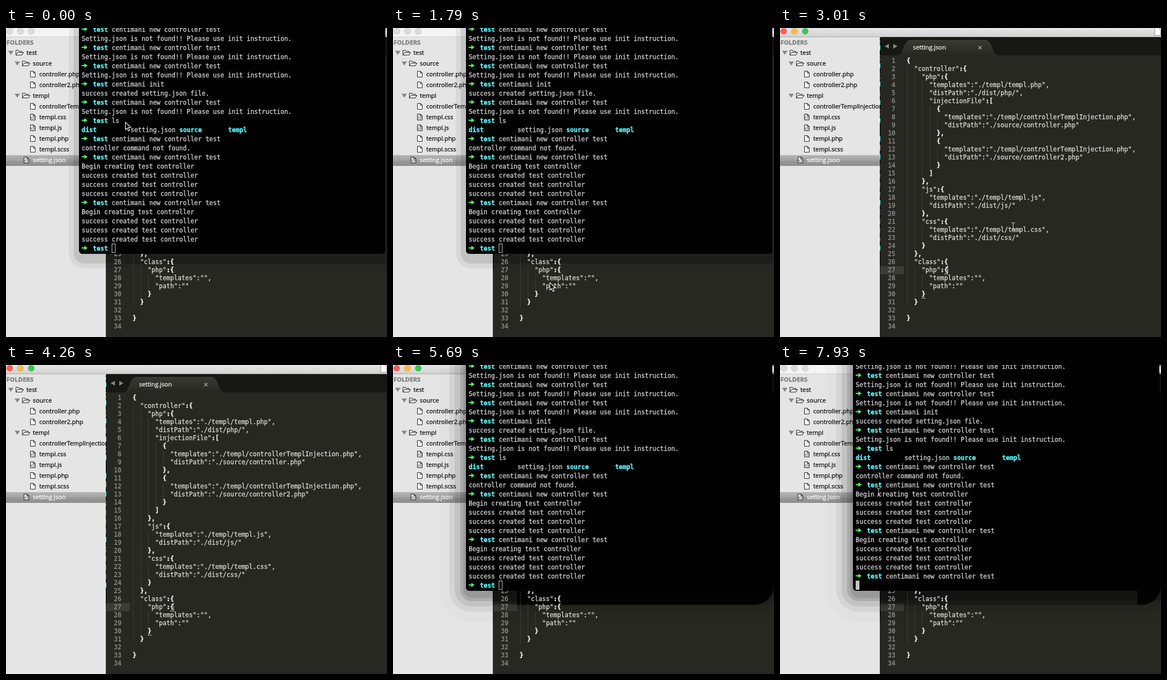
An HTML page with a canvas that plays this animation: 710x576 px, repeating every 8 s.

```html
<!DOCTYPE html>
<html lang="en">
<head>
<meta charset="utf-8">
<title>Terminal and editor</title>
<style>
  html, body { margin: 0; width: 100%; height: 100%; overflow: hidden; background: #272822; }
  canvas { display: block; }
</style>
</head>
<body>
<canvas id="stage" width="710" height="576"></canvas>
<script>
const ctx = document.getElementById('stage').getContext('2d');
const W = 710, H = 576, LOOP = 8000;
const MONO = '11.627px "DejaVu Sans Mono", monospace';
const SANS = '11.4px "Open Sans", sans-serif';
const COL = 7;
const EDITOR_FRONT = 1870, TERM_FRONT = 5690, TERM_ACTIVE = 5780;
const TYPED = 7030, ENTERED = 7930;

const code = `{
  "controller":{
    "php":{
      "templates":"./templ/templ.php",
      "distPath":"./dist/php/",
      "injectionFile":[
        {
          "templates":"./templ/controllerTemplInjection.php",
          "distPath":"./source/controller.php"
        },
        {
          "templates":"./templ/controllerTemplInjection.php",
          "distPath":"./source/controller2.php"
        }
      ]
    },
    "js":{
      "templates":"./templ/templ.js",
      "distPath":"./dist/js/"
    },
    "css":{
      "templates":"./templ/templ.css",
      "distPath":"./dist/css/"
    }
  },
  "class":{
    "php":{
      "templates":"",
      "path":""
    }
  }

}
`.split('\n');

// label, depth, kind
const tree = [
  ['test', 0, 'folder'], ['source', 1, 'folder'],
  ['controller.php', 2, 'file'], ['controller2.php', 2, 'file'],
  ['templ', 1, 'folder'], ['controllerTemplInjection.php', 2, 'file'],
  ['templ.css', 2, 'code'], ['templ.js', 2, 'code'],
  ['templ.php', 2, 'file'], ['templ.scss', 2, 'file'],
  ['setting.json', 1, 'code']
];

const CREATE = '$centimani new controller test';
const MISSING = 'Setting.json is not found!! Please use init instruction.';
const DONE = 'success created test controller';
const created = [CREATE, 'Begin creating test controller', DONE, DONE, DONE];
const history = [
  CREATE, MISSING, CREATE, MISSING, CREATE, MISSING,
  '$centimani init', 'success created setting.json file.',
  CREATE, MISSING, '$ls', '*', CREATE, 'controller command not found.',
  ...created, ...created
];

// time, pointer kind, x, y
const pointer = [
  [0, 'arrow', 222, 175], [360, 'arrow', 217, 175], [450, 'arrow', 214, 175],
  [1080, 'arrow', 228, 220], [1170, 'arrow', 255, 280],
  [1260, 'arrow', 282, 325], [1350, 'arrow', 291, 341],
  [1520, 'arrow', 290, 365], [1610, 'arrow', 289, 420],
  [1700, 'arrow', 291, 460], [1790, 'arrow', 292, 474],
  [1870, 'beam', 294, 480], [2140, 'beam', 280, 440], [2220, 'beam', 265, 360],
  [2310, 'beam', 285, 280], [2400, 'beam', 340, 234], [2490, 'beam', 450, 300],
  [2570, 'beam', 530, 430], [2660, 'beam', 540, 546], [2840, 'beam', 655, 563],
  [2930, 'beam', 560, 460], [3010, 'beam', 434, 370], [3100, 'beam', 442, 356],
  [3280, 'beam', 475, 400], [3370, 'beam', 492, 430],
  [3460, 'none', 0, 0], [5950, 'beam', 183, 237]
];

// time, caret opacity
const caret = [
  [0, 1], [2400, .5], [2490, 0], [2840, .5], [2930, 1], [3280, .6], [3370, .3], [3460, 0],
  [3820, .3], [3910, .6], [3990, 1], [4260, .5], [4440, 0],
  [4790, .5], [4880, 1], [5240, .5], [5420, 0]
];

const latest = (keys, t) => keys.filter(k => k[0] <= t).pop();

function rect(x, y, w, h, fill) {
  ctx.fillStyle = fill;
  ctx.fillRect(x, y, w, h);
}

// A hairline stroke gives the heavier font smoothing of the desktop.
function text(str, x, y, color, font, align = 'left') {
  ctx.font = font;
  ctx.textAlign = align;
  ctx.fillStyle = ctx.strokeStyle = color;
  ctx.lineWidth = .3;
  ctx.fillText(str, x, y);
  ctx.strokeText(str, x, y);
}

function poly(points, fill, stroke, width = 1) {
  ctx.beginPath();
  points.forEach(([x, y]) => ctx.lineTo(x, y));
  ctx.closePath();
  if (fill) { ctx.fillStyle = fill; ctx.fill(); }
  if (stroke) { ctx.strokeStyle = stroke; ctx.lineWidth = width; ctx.stroke(); }
}

function vertical(y0, y1, top, bottom) {
  const g = ctx.createLinearGradient(0, y0, 0, y1);
  g.addColorStop(0, top);
  g.addColorStop(1, bottom);
  return g;
}

function titleBar(active) {
  rect(0, 0, W, 16, active ? vertical(0, 16, '#e6e6e6', '#d2d2d2') : '#f4f4f4');
  rect(0, 16, W, 1, active ? '#a9a9a9' : '#cfcfcf');
  ['#fc5b57', '#fdbc40', '#34c84a'].forEach((color, i) => {
    ctx.beginPath();
    ctx.arc(7 + 20 * i, 6, 5.8, 0, 7);
    ctx.fillStyle = active ? color : '#dcdcdc';
    ctx.fill();
    ctx.strokeStyle = active ? 'rgba(0,0,0,.12)' : '#c6c6c6';
    ctx.lineWidth = 1;
    ctx.stroke();
  });
}

function pageIcon() {
  poly([[698.5, -1], [705, -1], [709.5, 4], [709.5, 13.5], [698.5, 13.5]], '#fff', '#999');
}

function folderIcon(x, y) {
  poly([[x + .5, y + 4.5], [x + .5, y - 4.5], [x + 5.5, y - 4.5], [x + 6.5, y - 2.5],
    [x + 11.5, y - 2.5], [x + 11.5, y - .5], [x + 14.5, y - .5], [x + 11.5, y + 4.5]], '#f0f0f0', '#222');
  poly([[x + .5, y + 4.5], [x + 3.5, y - .5], [x + 14.5, y - .5], [x + 11.5, y + 4.5]], '#f0f0f0', '#222');
}

function fileIcon(x, y, isCode) {
  y = Math.round(y);
  poly([[x + .5, y - 5.5], [x + 6, y - 5.5], [x + 9.5, y - 2], [x + 9.5, y + 5.5], [x + .5, y + 5.5]],
    isCode ? '#e4e4e4' : '#f7f7f7', '#222');
  poly([[x + 6, y - 5.5], [x + 6, y - 2], [x + 9.5, y - 2]], null, '#222');
  if (!isCode) return;
  ctx.beginPath();
  for (const d of [-1, 1]) {
    ctx.moveTo(x + 5 + d, y - .5);
    ctx.lineTo(x + 5 + 3 * d, y + 1.5);
    ctx.lineTo(x + 5 + d, y + 3.5);
  }
  ctx.stroke();
}

function sidebar() {
  ctx.save();
  ctx.beginPath();
  ctx.rect(0, 17, 186, H);
  ctx.clip();
  rect(0, 17, 187, H, '#e5e5e5');
  text('FOLDERS', 1, 31, '#7e7e7e', 'bold ' + SANS);
  tree.forEach(([label, depth, kind], i) => {
    const y = 46 + 20 * i, selected = i === tree.length - 1;
    if (selected) {
      rect(0, 237, 187, 20, '#8d8d8d');
      rect(0, 237, 187, 10, vertical(237, 247, '#b4b4b4', '#a2a2a2'));
      rect(0, 247, 187, 9, vertical(247, 256, '#999', '#8f8f8f'));
    }
    const x = [38, 50, 62][depth];
    if (kind === 'folder') {
      poly([[x - 34, y - 3.5], [x - 24, y - 3.5], [x - 29, y + 4]], '#858585');
      folderIcon(x - 20, y);
    } else {
      fileIcon(x - 17, y, kind === 'code');
    }
    text(label, x, y + 4, selected ? '#fff' : '#111', SANS);
  });
  ctx.restore();
}

function tabs() {
  rect(187, 17, W, 34, '#171814');
  poly([[203, 29.5], [203, 38.5], [195, 34]], '#85867f');
  poly([[211, 29.5], [211, 38.5], [219, 34]], '#85867f');
  ctx.beginPath();
  ctx.moveTo(222, 51);
  ctx.bezierCurveTo(232, 50, 230, 23, 243, 23);
  ctx.lineTo(383, 23);
  ctx.bezierCurveTo(396, 23, 393, 50, 404, 51);
  ctx.fillStyle = vertical(23, 51, '#383932', '#272822');
  ctx.fill();
  ctx.strokeStyle = '#46473f';
  ctx.lineWidth = 1;
  ctx.stroke();
  text('setting.json', 248, 40, '#f2f2f2', SANS);
  ctx.strokeStyle = '#a5a6a0';
  ctx.lineWidth = 1.5;
  ctx.beginPath();
  for (const d of [-3, 3]) {
    ctx.moveTo(372.5 - d, 33.5);
    ctx.lineTo(372.5 + d, 39.5);
  }
  ctx.stroke();
}

function editorPane(t) {
  rect(187, 17, W, H, '#272822');
  tabs();
  if (t >= EDITOR_FRONT) rect(187, 444, 44, 15, '#3b3c36');
}

function codeLines() {
  code.forEach((line, i) => {
    const y = 65 + 15 * i, indent = line.search(/\S|$/);
    text(i + 1, 215, y, '#8f908a', MONO, 'right');
    for (let c = 0; c < indent; c += 2)
      for (let d = 0; d < 15; d += 2) rect(237 + COL * c, y - 11 + d, 1, 1, '#50514a');
    for (const part of line.matchAll(/[{}[\],:]+|[^{}[\],:\s]+/g)) {
      const mark = /[{}[\]]/.test(part[0]);
      text(part[0], 236 + COL * part.index, y, mark ? '#f8f8f2' : '#dadecf', (mark ? 'bold ' : '') + MONO);
    }
  });
}

function editMarks(t) {
  rect(306, 458, 7, 1, '#d8d9d0');
  rect(264, 503, 7, 1, '#d8d9d0');
  ctx.globalAlpha = latest(caret, t)[1];
  rect(312, 443, 1, 15, '#f8f8f0');
  ctx.globalAlpha = 1;
}

function bands(steps) {
  for (const [spread, alpha] of steps) {
    ctx.beginPath();
    ctx.roundRect(136 - spread, -80, 571 + 2 * spread, 509 + spread, spread + 10);
    ctx.fillStyle = `rgba(0,0,0,${alpha})`;
    ctx.fill();
  }
}

function shadow(t) {
  if (t < EDITOR_FRONT) {
    bands([[19, .06], [10, .1]]);
    rect(187, 420, 520, 19, 'rgba(0,0,0,.12)');
    return;
  }
  bands([[50, .02], [31, .06], [21, .08], [11, .12], [5, .1]]);
  rect(187, 420, 479, 27, 'rgba(0,0,0,.28)');
  const left = t < TERM_ACTIVE ? 231 : 666;
  ctx.beginPath();
  ctx.roundRect(left, 52, W - left, 395, [0, 0, 36, 0]);
  ctx.fillStyle = '#030303';
  ctx.fill();
}

function promptLine(y, command) {
  rect(141, y - 6, 6, 2, '#50fa5a');
  poly([[146, y - 9], [152, y - 5], [146, y - 1]], '#50fa5a');
  text('test', 162, y, '#5cfbff', 'bold ' + MONO);
  text(command, 197, y, '#d6d6d6', MONO);
}

function terminalLine(line, y) {
  if (line[0] === '$') return promptLine(y, line.slice(1));
  if (line !== '*') return text(line, 141, y, '#d6d6d6', MONO);
  ['dist', 'setting.json', 'source', 'templ'].forEach((name, i) => {
    const plain = i === 1;
    text(name, 141 + 91 * i, y, plain ? '#d6d6d6' : '#5cfbff', (plain ? '' : 'bold ') + MONO);
  });
}

function terminal(t) {
  ctx.save();
  ctx.beginPath();
  ctx.roundRect(136, -20, 571, 441, 6);
  ctx.clip();
  rect(136, 0, 571, 421, '#000');
  const lines = [...history, t >= TYPED ? CREATE : '$'];
  const entered = t >= ENTERED, last = entered ? 398 : 415;
  lines.forEach((line, i) => terminalLine(line, last - 17 * (lines.length - 1 - i)));
  const x = entered ? 141 : t >= TYPED ? 400 : 197;
  if (t >= TERM_ACTIVE) {
    rect(x, 402, 7, 17, '#c4c4c4');
  } else {
    ctx.strokeStyle = '#c4c4c4';
    ctx.lineWidth = 1;
    ctx.strokeRect(x + .5, 402.5, 6, 16);
  }
  ctx.restore();
}

function drawPointer(t) {
  const [, kind, x, y] = latest(pointer, t);
  if (kind === 'arrow') {
    poly([[0, 0], [0, 14], [3, 11], [5.5, 16.5], [8, 15.5], [5.5, 10], [10, 10]]
      .map(([dx, dy]) => [x + .5 + dx, y + .5 + dy]), '#000', '#fff', 1.1);
  } else if (kind === 'beam') {
    ctx.beginPath();
    for (const d of [-1, 1]) {
      ctx.moveTo(x - 3, y + 7.5 * d);
      ctx.quadraticCurveTo(x + .5, y + 7.5 * d, x + .5, y + 5 * d);
      ctx.quadraticCurveTo(x + .5, y + 7.5 * d, x + 4, y + 7.5 * d);
    }
    ctx.moveTo(x + .5, y - 6);
    ctx.lineTo(x + .5, y + 6);
    ctx.moveTo(x - 1.5, y + 3.5);
    ctx.lineTo(x + 2.5, y + 3.5);
    ctx.strokeStyle = '#d8d8d8';
    ctx.lineWidth = 1;
    ctx.stroke();
  }
}

function draw(t) {
  const editorFront = t >= EDITOR_FRONT && t < TERM_FRONT;
  titleBar(t >= EDITOR_FRONT && t < TERM_ACTIVE);
  editorPane(t);
  sidebar();
  if (!editorFront) shadow(t);
  pageIcon();
  codeLines();
  if (editorFront) editMarks(t);
  else terminal(t);
  drawPointer(t);
}

const start = performance.now();
function tick() {
  draw((performance.now() - start) % LOOP);
  requestAnimationFrame(tick);
}
tick();
</script>
</body>
</html>
```
